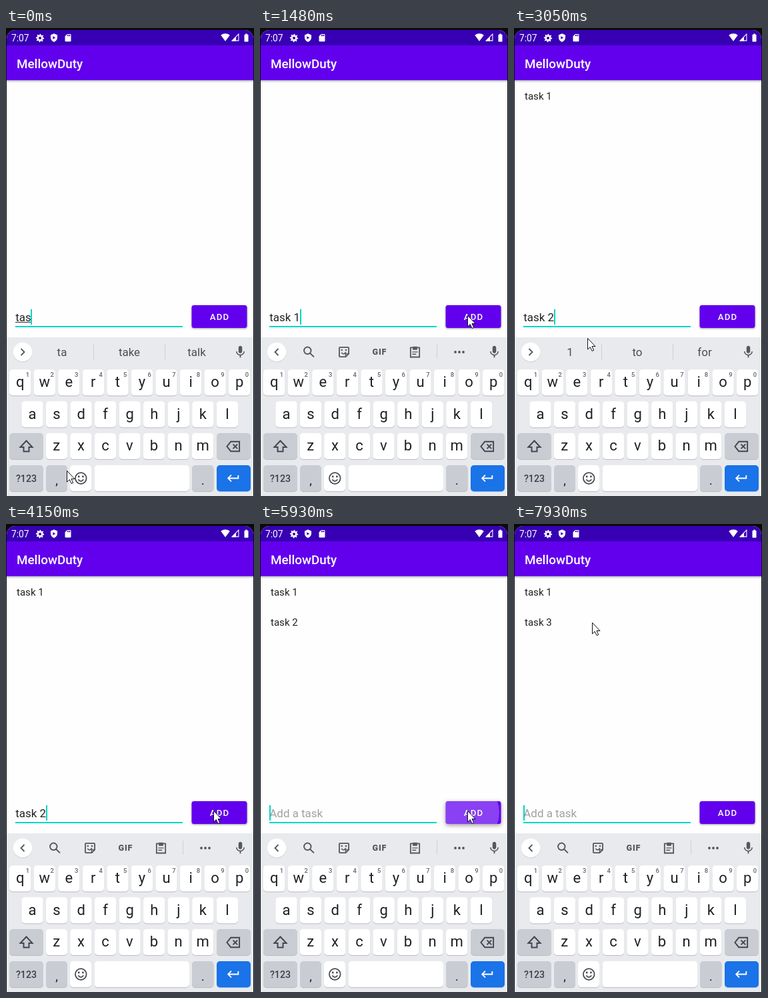
Recreate the animation shown at these times as an HTML page with a canvas. Size 372 px wide and 699 px high, loop 8 s.

```html
<!DOCTYPE html>
<html lang="en">
<head>
<meta charset="utf-8">
<title>Task list</title>
<style>
html, body { margin: 0; width: 100%; height: 100%; overflow: hidden; background: #000; }
canvas { display: block; width: 372px; height: 699px; }
</style>
</head>
<body>
<canvas id="stage"></canvas>
<script>
const W = 372, H = 699, LOOP = 8000;
const canvas = document.getElementById('stage');
const ctx = canvas.getContext('2d');
const dpr = window.devicePixelRatio || 1;
canvas.width = W * dpr;
canvas.height = H * dpr;

const PURPLE = '#6200ee', TEAL = '#03d6c3', GREY = '#55585c', INK = '#202124';

// Suggestion sets; null shows the toolbar.
const TA = ['ta', 'take', 'talk'];
const TASK = ['task', 'tasks', 'taste'];
const NEXT = ['1', 'to', 'for'];

// time, text, caret on, strip
const inputSteps = [
  [0, 'tas', 1, TA], [150, 'task', 1, TA], [290, 'task 1', 1, TASK], [420, 'task 1', 1, NEXT],
  [560, 'task 1', 1, null], [790, 'task 1', 0, null], [1360, 'task 1', 1, null],
  [1500, '', 1, null], [2080, '', 0, null],
  [2510, 't', 1, null], [2660, 'ta', 1, TA], [2790, 'tas', 1, TA], [2920, 'task', 1, TASK],
  [3050, 'task 2', 1, NEXT], [3300, 'task 2', 1, null], [3580, 'task 2', 0, null],
  [4150, 'task 2', 1, null], [4540, 't', 1, null], [4690, 'tas', 1, TA],
  [4820, 'task', 1, TASK], [4960, 'task 3', 1, NEXT], [5210, 'task 3', 1, null],
  [5490, 'task 3', 0, null], [5930, '', 1, null], [6460, '', 0, null],
  [6990, '', 1, null], [7380, '', 0, null], [7930, '', 1, null]
];

// time, x, y of the pointer tip
const pointerSteps = [
  [0, 91, 661], [910, 165, 600], [1060, 250, 518], [1210, 311, 429], [1780, 205, 452],
  [1930, 139, 462], [2080, 115, 463], [2230, 110, 463], [3720, 120, 463], [3860, 170, 459],
  [4000, 270, 438], [4150, 311, 428], [6330, 250, 330], [6460, 140, 210], [6590, 85, 155],
  [6710, 72, 146], [7660, 90, 144], [7790, 112, 146], [7930, 117, 147]
];

// time, opacity of the three rows
const listSteps = [
  [0, 0, 0, 0], [1640, .6, 0, 0], [1780, 1, 0, 0], [4410, 1, .5, 0], [4540, 1, 1, 0],
  [6080, 1, 1, .5], [6200, 1, 1, 1], [7260, 1, .3, 1], [7380, 1, 1, 0]
];

// time, ripple radius, ripple opacity
const rippleSteps = [
  [0, 0, 0], [1500, 48, .25], [1640, 90, .12], [1780, 0, 0],
  [4270, 48, .25], [4410, 90, .12], [4540, 0, 0],
  [5930, 48, .25], [6080, 90, .16], [6200, 90, .06], [6330, 0, 0]
];

const at = (steps, t) => steps.findLast(s => s[0] <= t);

function rect(x, y, w, h, color) {
  ctx.fillStyle = color;
  ctx.fillRect(x, y, w, h);
}

function round(x, y, w, h, r, color) {
  ctx.beginPath();
  ctx.roundRect(x, y, w, h, r);
  ctx.fillStyle = color;
  ctx.fill();
}

function disc(x, y, r, color) {
  ctx.beginPath();
  ctx.arc(x, y, r, 0, 7);
  ctx.fillStyle = color;
  ctx.fill();
}

function text(str, x, y, size, color, align = 'left', weight = 400, spacing = 0) {
  ctx.font = `${weight} ${size}px Roboto, sans-serif`;
  ctx.letterSpacing = spacing + 'px';
  ctx.textAlign = align;
  ctx.fillStyle = color;
  ctx.fillText(str, x, y);
  ctx.letterSpacing = '0px';
}

// Draws a path on a 24-unit grid, filled unless a line width is given.
function icon(path, cx, cy, size, color, line = 0) {
  ctx.save();
  ctx.translate(cx - size / 2, cy - size / 2);
  ctx.scale(size / 24, size / 24);
  const p = new Path2D(path);
  if (line) {
    ctx.strokeStyle = color;
    ctx.lineWidth = line;
    ctx.stroke(p);
  } else {
    ctx.fillStyle = color;
    ctx.fill(p, 'evenodd');
  }
  ctx.restore();
}

function gear(cx, cy) {
  ctx.beginPath();
  for (let i = 0; i < 32; i++) {
    const a = i / 32 * Math.PI * 2, r = i % 4 < 2 ? 6.2 : 4.5;
    ctx.lineTo(cx + r * Math.cos(a), cy + r * Math.sin(a));
  }
  ctx.fillStyle = '#fff';
  ctx.fill();
  disc(cx, cy, 2, '#3700b3');
}

function statusBar() {
  rect(1, 3, 370, 23, '#3700b3');
  text('7:07', 8, 20, 13.8, '#fff');
  gear(51, 15);
  icon('M12 1L3 5v6c0 5.5 3.8 10.7 9 12 5.2-1.3 9-6.5 9-12V5zM9 8l7 4-7 4z', 72, 14.5, 13.5, '#fff');
  icon('M18 2h-8L4 8v12c0 1.1.9 2 2 2h12c1.1 0 2-.9 2-2V4c0-1.1-.9-2-2-2zM12 8h-2V4h2zM15 8h-2V4h2zM18 8h-2V4h2z',
    93, 14.5, 13.5, '#fff');
  icon('M12 22L0 6a19 19 0 0 1 24 0z', 329, 14, 13.5, '#fff');
  icon('M3 21h18V3z', 344, 14, 13, '#fff', 2);
  icon('M2 22h12V10z', 344, 14, 13, '#fff');
  icon('M15.7 4H14V2h-4v2H8.3C7.6 4 7 4.6 7 5.3v15.3c0 .8.6 1.4 1.3 1.4h7.4c.7 0 1.3-.6 1.3-1.3V5.3C17 4.6 16.4 4 15.7 4z',
    360.5, 14.5, 14.5, '#fff');
}

function appBar() {
  const shade = ctx.createLinearGradient(0, 78, 0, 82);
  shade.addColorStop(0, 'rgba(0,0,0,.24)');
  shade.addColorStop(1, 'rgba(0,0,0,0)');
  rect(1, 78, 370, 4, shade);
  rect(1, 26, 370, 52, PURPLE);
  text('MellowDuty', 16, 59.5, 18.84, '#fff', 'left', 500);
}

function list(t) {
  const rows = at(listSteps, t);
  const labels = ['task 1', t < 7380 ? 'task 2' : 'task 3', 'task 3'];
  labels.forEach((label, i) => {
    ctx.globalAlpha = rows[i + 1];
    text(label, 16, 107 + 45 * i, 15.07, '#222');
  });
  ctx.globalAlpha = 1;
}

function inputRow(t) {
  const [, value, caret] = at(inputSteps, t);
  rect(14, 445, 251, 2, TEAL);
  text(value || 'Add a task', 14.3, 438, 16.96, value ? '#222' : '#a0a0a0');
  const w = value ? ctx.measureText(value).width : 0;
  if (value && !value.includes(' ')) rect(14, 439, w, 1, '#333');
  if (caret) rect(Math.round(14 + w), 420, 2, 23, TEAL);
}

function addButton(t) {
  const [, radius, alpha] = at(rippleSteps, t);
  ctx.save();
  ctx.shadowColor = 'rgba(0,0,0,.4)';
  ctx.shadowBlur = (alpha ? 6 : 3) * dpr;
  ctx.shadowOffsetY = (alpha ? 2 : 1) * dpr;
  round(278.5, 414, 83, 34, 3.5, PURPLE);
  ctx.restore();
  if (alpha) {
    ctx.save();
    ctx.beginPath();
    ctx.roundRect(278.5, 414, 83, 34, 3.5);
    ctx.clip();
    disc(311, 431, radius, `rgba(255,255,255,${alpha})`);
    ctx.restore();
  }
  text('ADD', 320.5, 436, 13.2, '#fff', 'center', 500, 1.18);
}

function key(x, y, w, color = '#fff', edge = '#b9bcc1') {
  round(x, y + 1, w, 39, 5, edge);
  round(x, y, w, 39, 5, color);
}

function letterRow(letters, first, y, hints) {
  [...letters].forEach((c, i) => {
    const x = first + i * 36.55;
    key(x - 16.2, y, 32.4);
    text(c, x, y + 26, 22, INK, 'center');
    if (hints) text((i + 1) % 10, x + 11.3, y + 11, 9.4, '#5f6368', 'center', 500);
  });
}

function toolbar() {
  icon('M15.5 9.5a6 6 0 1 1-12 0a6 6 0 0 1 12 0M14 14l6.5 6.5', 73.5, 484, 21, GREY, 2.2);
  icon('M5 3.5h14q1.500 1.500 1.500v10l-5.500 5.500H5q-1.500 0-1.500-1.500V5q0-1.500 1.500-1.500z'
    .replace('q1.500 1.500 1.500', 'q1.500 0 1.500 1.500'), 126, 484, 20, GREY, 2.2);
  icon('M20 15h-5v5M7.500 13q4 5 8-1', 126, 484, 20, GREY, 1.8);
  disc(122.8, 481, 1.3, GREY);
  disc(129, 481, 1.3, GREY);
  text('GIF', 179.4, 488, 12.6, GREY, 'center', 900, .8);
  icon('M4 4h16v17H4z', 232.5, 484, 20, GREY, 2.2);
  icon('M8 2h8v6H8zM7 11h10v1.700H7zM7 15h7v1.700H7z', 232.5, 484, 20, GREY);
  rect(265, 473, 1, 21, '#d0d3d7');
  for (const x of [293, 299, 305]) disc(x, 484, 1.9, GREY);
}

function strip(words) {
  disc(25, 485, 14.3, 'rgba(0,0,0,.12)');
  disc(25, 484, 14.2, '#fff');
  icon(words ? 'M9 6l6 6-6 6' : 'M15 6l-6 6 6 6', 25, 484, 20, GREY, 2.2);
  if (words) {
    words.forEach((word, i) => text(word, 84 + 101 * i, 490, 16.96, '#4b4e52', 'center'));
    rect(131, 472, 1, 23, '#cdd0d4');
    rect(238, 472, 1, 23, '#cdd0d4');
  } else toolbar();
  icon('M12 14c1.700 0 3-1.300 3-3V5c0-1.700-1.300-3-3-3S9 3.300 9 5v6c0 1.700 1.300 3 3 3zM17.300 11c0 3-2.500 5.100-5.300 5.100S6.700 14 6.700 11H5c0 3.400 2.700 6.200 6 6.700V21h2v-3.300c3.300-.5 6-3.300 6-6.700z',
    351.5, 484, 22, GREY);
}

function keyboard(t) {
  const dark = '#c9cdd3';
  rect(1, 462, 370, 237, '#e8eaed');
  strip(at(inputSteps, t)[3]);
  letterRow('qwertyuiop', 21.2, 510, true);
  letterRow('asdfghjkl', 39.5, 557.5);
  letterRow('zxcvbnm', 75.8, 605);

  key(5, 605, 51, dark);
  icon('M12 3.500L3 13h5v6.500h8V13h5z', 30.5, 625, 24, '#44474b', 2);
  key(316, 605, 51, dark);
  icon('M21.500 4.500H8L2 12l6 7.500h13.500zM11.500 8.500l7 7M18.500 8.500l-7 7', 341, 625, 23, '#44474b', 2);

  key(5, 653, 51, dark);
  text('?123', 30.5, 678, 14.2, '#3c4043', 'center', 500);
  key(60, 653, 32, dark);
  text(',', 76, 682, 19, INK, 'center');
  key(96, 653, 32);
  icon('M21.500 12a9.500 9.500 0 1 1-19 0a9.500 9.500 0 0 1 19 0M7.500 14q4.500 6 9 0', 112.3, 672.5, 21, '#44474b', 2);
  disc(109.2, 670, 1.4, '#44474b');
  disc(115.4, 670, 1.4, '#44474b');
  key(132.500, 653, 142.5);
  key(279, 653, 32.500, dark);
  text('.', 295.3, 682, 19, INK, 'center');
  key(316, 653, 51, '#1a73e8', '#a9bfe0');
  icon('M19 7v4H5.800l3.600-3.600L8 6l-6 6 6 6 1.400-1.400L5.800 13H21V7z', 341, 672.5, 22, '#fff');
}

function pointer(t) {
  const [, x, y] = at(pointerSteps, t);
  ctx.save();
  ctx.translate(x + .5, y + .5);
  const shape = new Path2D('M0 0V16.500L3.800 13L6.600 19L9.200 17.800L6.500 12H11.500z');
  ctx.fillStyle = '#fff';
  ctx.fill(shape);
  ctx.strokeStyle = '#111';
  ctx.lineWidth = 1;
  ctx.stroke(shape);
  ctx.restore();
}

function draw(t) {
  ctx.setTransform(dpr, 0, 0, dpr, 0, 0);
  rect(0, 0, W, H, '#0a0a0c');
  ctx.save();
  ctx.beginPath();
  ctx.roundRect(1, 3, 370, 700, [13, 13, 0, 0]);
  ctx.clip();
  rect(1, 3, 370, 696, '#fefefe');
  statusBar();
  appBar();
  list(t);
  inputRow(t);
  addButton(t);
  keyboard(t);
  ctx.restore();
  pointer(t);
}

const start = performance.now();
function tick() {
  draw((performance.now() - start) % LOOP);
  requestAnimationFrame(tick);
}
tick();
</script>
</body>
</html>
```
